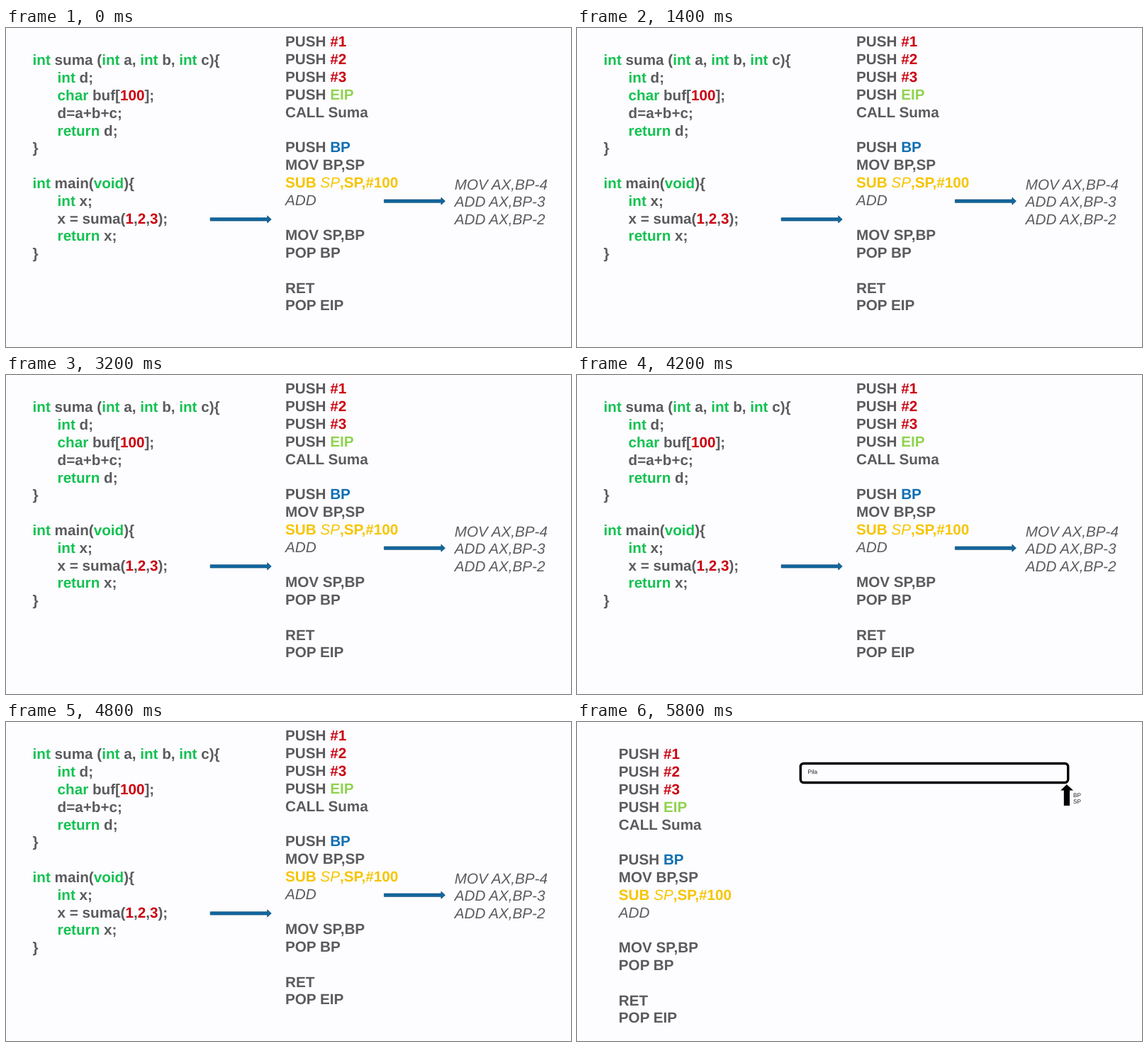
An HTML page that plays this animation: 797 px wide and 450 px high, repeating every 8 s.

```html
<!DOCTYPE html>
<html lang="es">
<head>
<meta charset="utf-8">
<style>
html, body { margin: 0; width: 100%; height: 100%; overflow: hidden; background: #fdfcfe; }
svg { display: block; width: 100vw; height: 100vh; }
text { font-family: "Liberation Sans", Arial, sans-serif; white-space: pre; text-rendering: geometricPrecision; }
.code { font-size: 20.67px; font-weight: 700; fill: #5b5b5d; }
.small { font-size: 8.2px; fill: #222; }
.g { fill: #14c252; }
.r { fill: #cb000f; }
.l { fill: #90d350; }
.b { fill: #0f6fb3; }
.y { fill: #f6c500; }
.i { font-weight: 400; font-style: italic; }
</style>
</head>
<body>
<svg viewBox="0 0 797 450" xmlns="http://www.w3.org/2000/svg">
  <rect width="797" height="450" fill="#fdfcfe"/>
  <g id="program"></g>
  <g id="stack">
    <rect x="315.3" y="58.5" width="377.4" height="27" rx="4.5" fill="#fdfcfe" stroke="#000" stroke-width="3.4"/>
    <path d="M690.8 88L700 96.5H695V118H686.8V96.5H682.2Z"/>
    <text class="small" x="325.5" y="73">Pila</text>
    <text class="small" x="700" y="106">BP</text>
    <text class="small" x="700" y="114.8">SP</text>
  </g>
</svg>
<script>
const LOOP = 8000, CUT = 5600, LEADING = 24.8, INDENT = 35;
const program = document.getElementById('program');
const stack = document.getElementById('stack');

// Markup: {classes:text} colours a span, a leading ">" indents the line.
const source = [
  '{g:int} suma ({g:int} a, {g:int} b, {g:int} c){',
  '>{g:int} d;',
  '>{g:char} buf[{r:100}];',
  '>d=a+b+c;',
  '>{g:return} d;',
  '}',
  '',
  '{g:int} main({g:void}){',
  '>{g:int} x;',
  '>x = suma({r:1},{r:2},{r:3});',
  '>{g:return} x;',
  '}'
];
const assembly = [
  'PUSH {r:#1}', 'PUSH {r:#2}', 'PUSH {r:#3}', 'PUSH {l:EIP}', 'CALL Suma', '',
  'PUSH {b:BP}', 'MOV BP,SP', '{y:SUB }{y i:SP}{y:,SP,#100}', '{i:ADD}', '',
  'MOV SP,BP', 'POP BP', '', 'RET', 'POP EIP'
];
const sum = ['{i:MOV AX,BP-4}', '{i:ADD AX,BP-3}', '{i:ADD AX,BP-2}'];

function addLines(parent, lines, x, y) {
  const markup = lines.map((line, n) => {
    const indented = line.startsWith('>');
    const spans = line.slice(indented ? 1 : 0)
      .replace(/\{([a-z ]+):([^}]+)\}/g, '<tspan class="$1">$2</tspan>');
    return `<text class="code" x="${x + (indented ? INDENT : 0)}" y="${y + n * LEADING}">${spans}</text>`;
  });
  parent.insertAdjacentHTML('beforeend', markup.join(''));
}

function addArrow(parent, x, y) {
  parent.insertAdjacentHTML('beforeend',
    `<path transform="translate(${x} ${y})" d="M0 -2.1H80.5V-5L86 0L80.5 5V2.1H0Z"
      fill="#1268a0" stroke="#0d4c78" stroke-width=".8"/>`);
}

addLines(program, source, 37.6, 52.4);
addLines(program, assembly, 394, 26.4);
addLines(program, sum, 632.7, 227.6);
addArrow(program, 288.2, 269.9);
addArrow(program, 533.4, 244.2);
addLines(stack, assembly, 58.8, 52.3);

function draw(t) {
  program.style.display = t < CUT ? '' : 'none';
  stack.style.display = t < CUT ? 'none' : '';
}

const start = performance.now();
function tick() {
  draw((performance.now() - start) % LOOP);
  requestAnimationFrame(tick);
}
tick();
</script>
</body>
</html>
```
